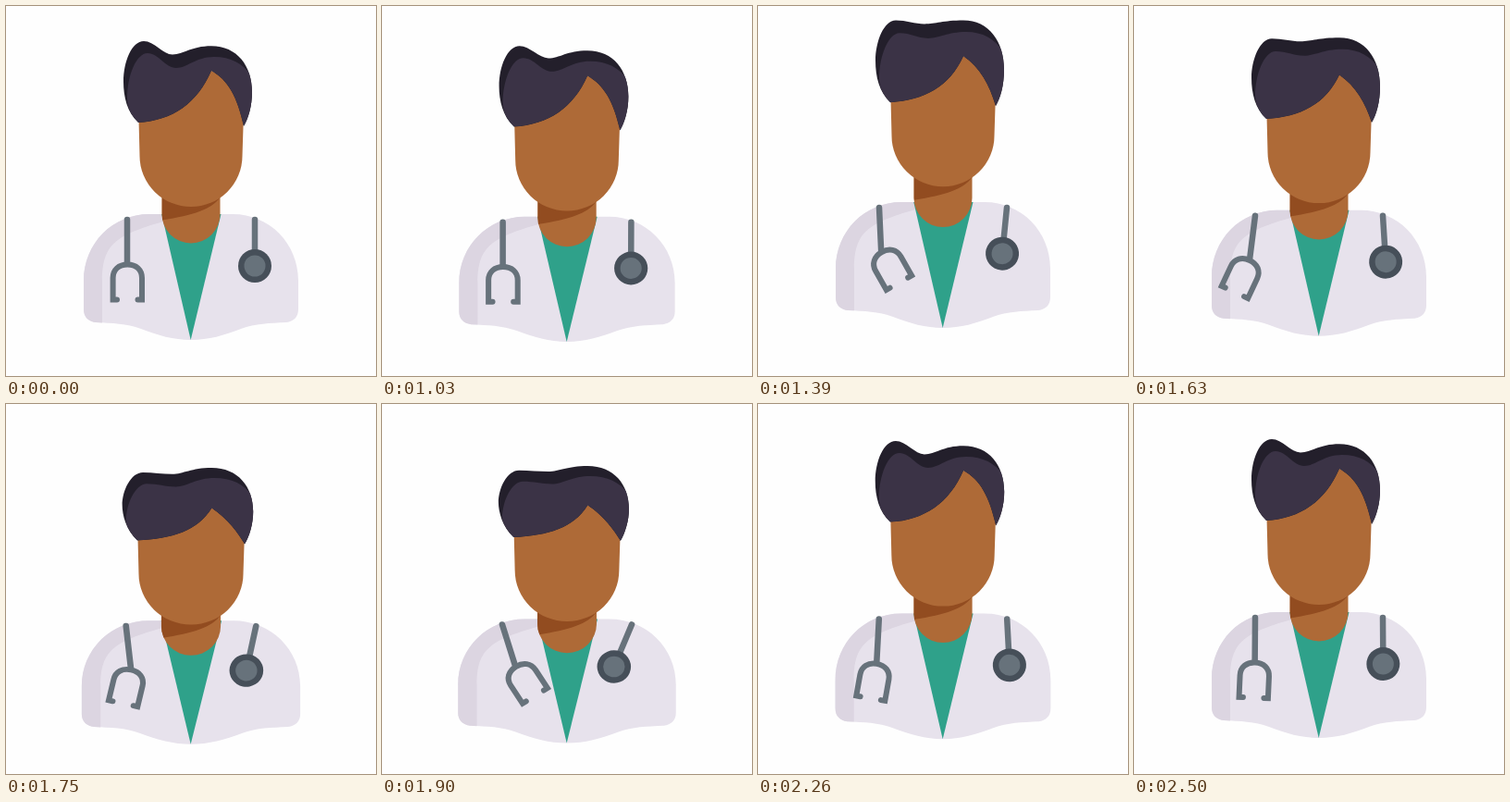
An HTML page with a canvas for the animation above (2530 ms loop, 400 by 400 pixels).

```html
<!DOCTYPE html>
<html>
<head>
<meta charset="utf-8">
<style>
  html, body { margin: 0; height: 100%; overflow: hidden; background: #fefefe; }
  canvas { display: block; }
</style>
</head>
<body>
<canvas id="stage" width="400" height="400"></canvas>
<script>
const ctx = document.getElementById('stage').getContext('2d');
const LOOP = 2530, START = 1030, STEP = 30;
const SKIN = '#ae6a37', STEEL = '#67727b';

// Extremes of the hop: rest, crouch, peak, landing, rebound, dip, rest
const BEATS = [975, 1150, 1470, 1805, 2090, 2300, 2500];
const BODY = [0, 12.5, -17.5, 11, -3, 2, 0];
const HEAD = [0, 20, -29, 25, -3, 2, 0];
const FLATTEN = [0, .8, .4, 1, 0, 0, 0];
const SWING = [0, 13, -10, 17, -4, -1, 0];

// Cosine easing from one extreme to the next
function ease(values, t) {
  if (t <= BEATS[0]) return values[0];
  const next = BEATS.findIndex(beat => beat > t);
  if (next < 0) return values.at(-1);
  const u = (t - BEATS[next - 1]) / (BEATS[next] - BEATS[next - 1]);
  return values[next - 1] + (values[next] - values[next - 1]) * (1 - Math.cos(Math.PI * u)) / 2;
}

// Hair, rods and fork trail the body, each with its own delay
function poseAt(t) {
  const body = ease(BODY, t), head = ease(HEAD, t);
  const flat = ease(FLATTEN, t - 30), rod = ease(SWING, t - 90);
  return {
    body, head, flat, rod,
    neck: (body + head) / 2,
    stretch: -.0075 * ease(BODY, t - 30),
    fork: 2.6 * ease(SWING, t - 185),
    disc: rod + 6 * flat,
    squash: Math.max(0, body) * .002
  };
}

function fill(path, color) {
  ctx.fillStyle = color;
  ctx.fill(typeof path === 'string' ? new Path2D(path) : path);
}

function line(path, width) {
  ctx.strokeStyle = STEEL;
  ctx.lineWidth = width;
  ctx.lineCap = 'round';
  ctx.stroke(new Path2D(path));
}

function circle(x, y, r, color) {
  const p = new Path2D();
  p.arc(x, y, r, 0, 7);
  fill(p, color);
}

function group(draw) {
  ctx.save();
  draw();
  ctx.restore();
}

function turn(x, y, degrees) {
  ctx.translate(x, y);
  ctx.rotate(degrees * Math.PI / 180);
  ctx.translate(-x, -y);
}

function place(y, squash, scaleY = 1) {
  ctx.translate(200, y + 225);
  ctx.scale(1 + squash, scaleY);
  ctx.translate(-200, -225);
}

function drawCoat() {
  fill('M155 225H245C285 225 316 257 316 297V328C316 336 311 341 303 342' +
    'C285 343 270 343 254 349C236 356 219 361 200 361S164 356 146 349' +
    'C130 343 115 343 97 342C89 341 84 336 84 328V297C84 257 115 225 155 225Z', '#e7e2ec');
  fill('M170 225H155C115 225 84 257 84 297V328C84 336 89 341 97 342L104 342.4V297' +
    'C104 258 118 248 170 233Z', '#dcd5e1');
  fill('M168.3 225H232.5L199.7 361Z', '#2fa18a');
}

function drawNeck(shadowDrop) {
  const neck = new Path2D('M168.5 185H231.5V225A31.5 31.5 0 0 1 168.5 225Z');
  fill(neck, SKIN);
  ctx.clip(neck);
  ctx.translate(0, shadowDrop);
  fill('M168.5 165H231.5V207C222 220 203 226 168.5 231.5Z', '#924c20');
}

function drawHead(flat, stretch) {
  const at = (x, y, push = 0) => `${x} ${126 + (y - 126) * (1 + stretch) + push * flat} `;
  const dip = -24 * (1 - flat);
  const tip = at(222, 70, 20);
  const front = 'C266 108 262 122 257 130' +
    'C' + at(250, 98, 21) + at(240, 80, 23) + tip +
    'C' + at(207, 105, 11) + at(180, 124) + '143 126Z';

  fill('M143.5 122L144.5 162A55.5 55 0 0 0 255.5 162L256.5 130L' + at(262, 90, 20) +
    'L' + tip + 'Z', SKIN);

  const hair = new Path2D('M143 126C131 115 127 98 ' + at(127, 82, 4) +
    'C' + at(127, 60, 10) + at(136, 38, 11) + at(149, 38, 11) +
    'C' + at(160, 38, 11) + at(170, 52.5, dip) + at(180, 52.5, dip) +
    'C' + at(192, 52.5, dip) + at(200, 43.3) + at(222, 43.3) +
    'C' + at(250, 43.3) + at(266, 65) + at(266, 93) + front);
  fill(hair, '#231f2b');
  ctx.clip(hair);
  fill('M143 126C136 119 131 110 ' + at(131, 100, 4) +
    'C' + at(131, 75, 10) + at(141, 51, 11) + at(153, 51, 11) +
    'C' + at(165, 51, 11) + at(172, 67, dip) + at(184, 67, dip) +
    'C' + at(196, 67, dip) + at(205, 55) + at(225, 55) +
    'C' + at(243, 55) + at(256, 62) + at(265, 75) +
    'L' + at(268, 93) + front, '#3b3346');
}

function drawStethoscope(rod, fork, disc) {
  group(() => {
    turn(131, 231, -rod);
    line('M131 231V278', 6.5);
    turn(131, 279, rod - fork);
    line('M120 317.5H115.6V294C115.6 285 122 279.5 131.3 279.5S147 285 147 294V317.5H142.5', 6);
  });
  group(() => {
    turn(269, 231, disc);
    line('M269 231V268', 6.5);
    circle(269, 281, 18, '#464f59');
    circle(269, 281, 11.5, STEEL);
  });
}

function render(now) {
  const t = now % LOOP;
  const time = t < START ? 0 : START + Math.floor((t - START) / STEP) * STEP;
  const { body, head, neck, flat, stretch, rod, fork, disc, squash } = poseAt(time);

  ctx.fillStyle = '#fefefe';
  ctx.fillRect(0, 0, 400, 400);
  group(() => { place(body, squash, 1 - squash); drawCoat(); });
  group(() => { place(neck, squash); drawNeck(head - neck); });
  group(() => { place(head, squash); drawHead(flat, stretch); });
  group(() => { place(body, squash, 1 - squash); drawStethoscope(rod, fork, disc); });
}

const begin = performance.now();
function tick() {
  render(performance.now() - begin);
  requestAnimationFrame(tick);
}
tick();
</script>
</body>
</html>
```
